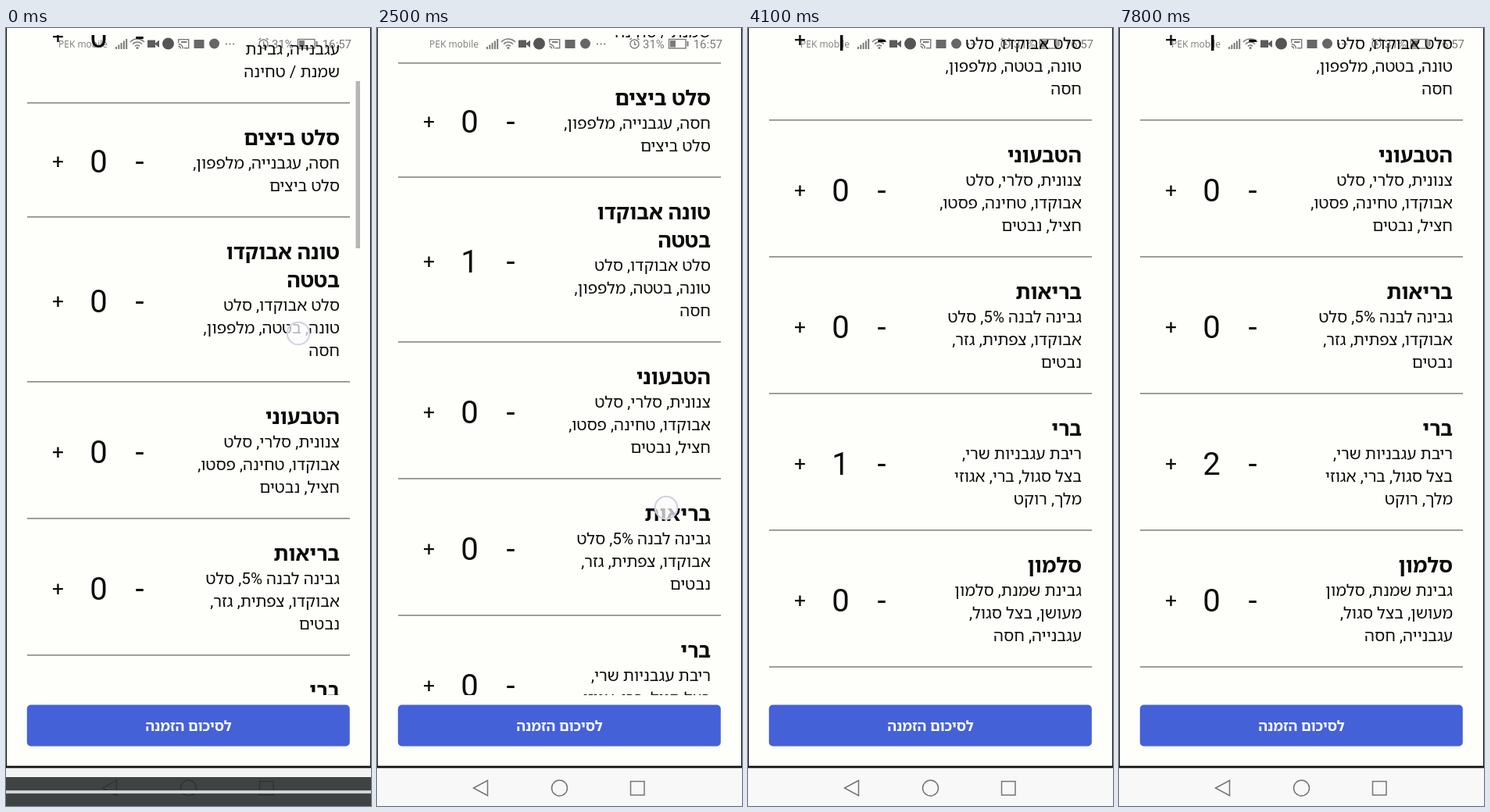
Recreate the animation shown at these times as an HTML page with a canvas. Size 467x996 px, loop 8000 ms.

```html
<!DOCTYPE html>
<html lang="he">
<head>
<meta charset="utf-8">
<title>Sandwich order</title>
<style>
html, body { margin: 0; width: 100%; height: 100%; overflow: hidden; background: #fefefb; }
canvas { display: block; width: 467px; height: 996px; }
</style>
</head>
<body>
<canvas id="stage" width="467" height="996"></canvas>
<script>
const ctx = document.getElementById('stage').getContext('2d');
const LOOP = 8000, STEP = 100;
const FONT = "Roboto, 'Noto Sans Hebrew', 'Open Sans', 'Liberation Sans', sans-serif";
const PAPER = '#fefefb', INK = '#0c0c0c', GREY = '#7b7b7b';
const TITLE_PITCH = 36, TEXT_PITCH = 29, ROW_PADDING = 52;

const rows = [
  { title: [''], text: ['', 'עגבנייה, גבינת', 'שמנת / טחינה'] },
  { title: ['סלט ביצים'], text: ['חסה, עגבנייה, מלפפון,', 'סלט ביצים'] },
  { title: ['טונה אבוקדו', 'בטטה'], text: ['סלט אבוקדו, סלט', 'טונה, בטטה, מלפפון,', 'חסה'] },
  { title: ['הטבעוני'], text: ['צנונית, סלרי, סלט', 'אבוקדו, טחינה, פסטו,', 'חציל, נבטים'] },
  { title: ['בריאות'], text: ['גבינה לבנה 5%, סלט', 'אבוקדו, צפתית, גזר,', 'נבטים'] },
  { title: ['ברי'], text: ['ריבת עגבניות שרי,', 'בצל סגול, ברי, אגוזי', 'מלך, רוקט'] },
  { title: ['סלמון'], text: ['גבינת שמנת, סלמון', 'מעושן, בצל סגול,', 'עגבנייה, חסה'] }
];

let edge = -79.5;
for (const row of rows) {
  row.top = edge;
  edge += row.title.length * TITLE_PITCH + row.text.length * TEXT_PITCH + ROW_PADDING;
  row.bottom = edge;
}

const taps = [
  { row: rows[2], at: 1000, x: 80, y: 293 },
  { row: rows[5], at: 3400, x: 71, y: 562 },
  { row: rows[5], at: 4200, x: 66, y: 555 }
];

const clamp = v => Math.min(1, Math.max(0, v));
const mix = (a, b, p) => a + (b - a) * p;

// Rises from 0 to 1 over "rise" ms, falls back after "end"
const pulse = (t, start, end, rise, fall) => clamp((t - start) / rise) * clamp(1 - (t - end) / fall);

// A flick that picks up speed, then coasts to rest
function glide(age, pace) {
  if (age <= 0) return 0;
  return age >= 800 ? 1 : 1 - Math.exp(-Math.pow(age / pace, 1.3));
}

const scrollAt = t => 51 * glide(t, 234) + 284 * glide(t - 2500, 196);
const barAlpha = t => pulse(t, -200, 900, 100, 200) + pulse(t, 2500, 3600, 100, 300);
const tapDip = (tap, t) => .7 * pulse(t, tap.at, tap.at + 300, 100, 300);

function rect(x, y, w, h, color) {
  ctx.fillStyle = color;
  ctx.fillRect(x, y, w, h);
}

function disc(x, y, r, color) {
  ctx.fillStyle = color;
  ctx.beginPath();
  ctx.arc(x, y, r, 0, 7);
  ctx.fill();
}

function arc(x, y, r, a = 0, b = Math.PI * 2) {
  ctx.beginPath();
  ctx.arc(x, y, r, a, b);
  ctx.stroke();
}

function triangle(x0, x1, y, half) {
  ctx.beginPath();
  ctx.moveTo(x0, y);
  ctx.lineTo(x1, y - half);
  ctx.lineTo(x1, y + half);
  ctx.closePath();
}

function label(str, x, y, style, color, align = 'center', family = FONT) {
  ctx.font = style + ' ' + family;
  ctx.fillStyle = color;
  ctx.textAlign = align;
  ctx.direction = /[א-ת]/.test(str) ? 'rtl' : 'ltr';
  ctx.fillText(str, x, y);
}

function drawStatus() {
  label('PEK mobile', 67, 24.5, '12px', GREY, 'left', "'Open Sans', sans-serif");
  for (let i = 0; i < 5; i++) rect(140 + i * 3.3, 24 - i * 2.5, 2, 3 + i * 2.5, GREY);

  ctx.strokeStyle = GREY;
  ctx.lineWidth = 1.6;
  for (const r of [4, 8, 12]) arc(168, 26, r, -Math.PI * .77, -Math.PI * .23);
  disc(168, 25.5, 1.6, GREY);

  rect(181, 15.5, 10, 9.5, '#5c5c5c');
  triangle(190, 196, 20.2, 4.7);
  ctx.fill();
  disc(207.5, 20, 7.5, '#555');

  ctx.lineWidth = 1.4;
  ctx.strokeRect(220.7, 14.7, 13, 11);
  rect(220, 19, 8, 8, PAPER);
  for (const r of [3, 6]) arc(220.5, 26.5, r, -Math.PI / 2, 0);
  rect(224, 17, 7.5, 2, GREY);

  rect(240.5, 15, 13, 11, '#686868');
  disc(266.5, 20, 6.5, '#666');
  for (let i = 0; i < 3; i++) disc(282 + i * 4.6, 20.5, 1.1, GREY);

  arc(329.5, 20.5, 5.5);
  for (const a of [1.3, 1.7]) arc(329.5, 20.5, 8, Math.PI * a - .2, Math.PI * a + .2);
  rect(329, 17, 1.3, 4.5, GREY);
  rect(329, 20.5, 3, 1.3, GREY);

  label('31%', 340, 25.5, '15px', GREY, 'left');
  ctx.strokeRect(373.5, 14.5, 21.5, 11.5);
  rect(375, 16, 7, 8.5, GREY);
  rect(396.5, 17, 2, 6.5, GREY);
  label('16:57', 442, 25.5, '15px', GREY, 'right');
}

function drawRow(row, scroll, t) {
  const top = row.top - scroll, bottom = row.bottom - scroll;
  const firstText = bottom - 32.5 - (row.text.length - 1) * TEXT_PITCH;
  row.title.forEach((s, i) => label(s, 427, Math.round(top + 54.5 + i * TITLE_PITCH), 'bold 26.5px', INK, 'right'));
  row.text.forEach((s, i) => label(s, 427, Math.round(firstText + i * TEXT_PITCH), '20.6px', INK, 'right'));

  const own = taps.filter(tap => tap.row === row);
  const count = own.filter(tap => t >= tap.at + 300).length;
  const mid = Math.round((top + bottom) / 2 + 2.5);
  ctx.globalAlpha = 1 - Math.max(0, ...own.map(tap => tapDip(tap, t)));
  label('+', 66.5, mid + 8.5, '26.5px', INK);
  ctx.globalAlpha = 1;
  label(String(count), 118.5, mid + 14, '40px', INK);
  label('-', 171, mid + 14, '40px', INK);
  rect(27, bottom - .3, 413, 1.4, '#777');
}

function drawMenu(t) {
  const scroll = scrollAt(t);
  ctx.save();
  ctx.beginPath();
  ctx.rect(0, 9, 467, 845);
  ctx.clip();
  for (const row of rows) drawRow(row, scroll, t);
  ctx.globalAlpha = barAlpha(t);
  rect(447.5, 68 + scroll * .253, 5.5, 214, '#b6b6b6');
  ctx.restore();
}

function drawButton() {
  ctx.fillStyle = '#4561d8';
  ctx.beginPath();
  ctx.roundRect(26.8, 866.6, 413, 52.8, 5);
  ctx.fill();
  label('לסיכום הזמנה', 233.5, 900, 'bold 18px', '#fff');
}

function drawNav(t) {
  const dark = t < 1000;
  rect(0, 947, 467, 49, dark ? '#f3f3f3' : '#f8f8f8');
  if (dark) rect(0, 959, 467, 37, '#404344');
  ctx.strokeStyle = dark ? '#303334' : '#747474';
  ctx.lineWidth = 1.5;
  triangle(123.5, 141.5, 973, 9.7);
  ctx.stroke();
  arc(233.5, 973, 10);
  ctx.strokeRect(324.5, 964.5, 17.5, 17.5);
  if (dark) rect(0, 976, 467, 4, '#d2d3d3');
}

function drawFrame() {
  for (const x of [0, 466]) rect(x, 0, 1, 947, '#111');
  rect(0, 944.6, 467, 2.8, '#111');
}

function drawTouch(x, y, alpha) {
  ctx.globalAlpha = alpha;
  disc(x, y, 15, 'rgba(252,251,253,.7)');
  ctx.strokeStyle = '#d2d0e2';
  ctx.lineWidth = 2;
  arc(x, y, 14.3);
  ctx.globalAlpha = 1;
}

function drawTouches(t) {
  for (const tap of taps) {
    if (t >= tap.at) drawTouch(tap.x, tap.y, clamp((tap.at + 500 - t) / 200));
  }
  // The finger follows the list while dragging
  if (t < 200) drawTouch(374, 391 - scrollAt(t), 1 - t / 200);
  if (t >= 2500 && t < 2900) drawTouch(mix(370, 364, (t - 2500) / 300), 380 + scrollAt(2800) - scrollAt(t), 1);
}

function draw(t) {
  rect(0, 0, 467, 996, PAPER);
  drawStatus();
  drawMenu(t);
  drawButton();
  drawNav(t);
  drawFrame();
  drawTouches(t);
}

const begin = performance.now();
function tick() {
  const t = (performance.now() - begin) % LOOP;
  draw(Math.floor(t / STEP) * STEP);
  requestAnimationFrame(tick);
}
tick();
</script>
</body>
</html>
```
